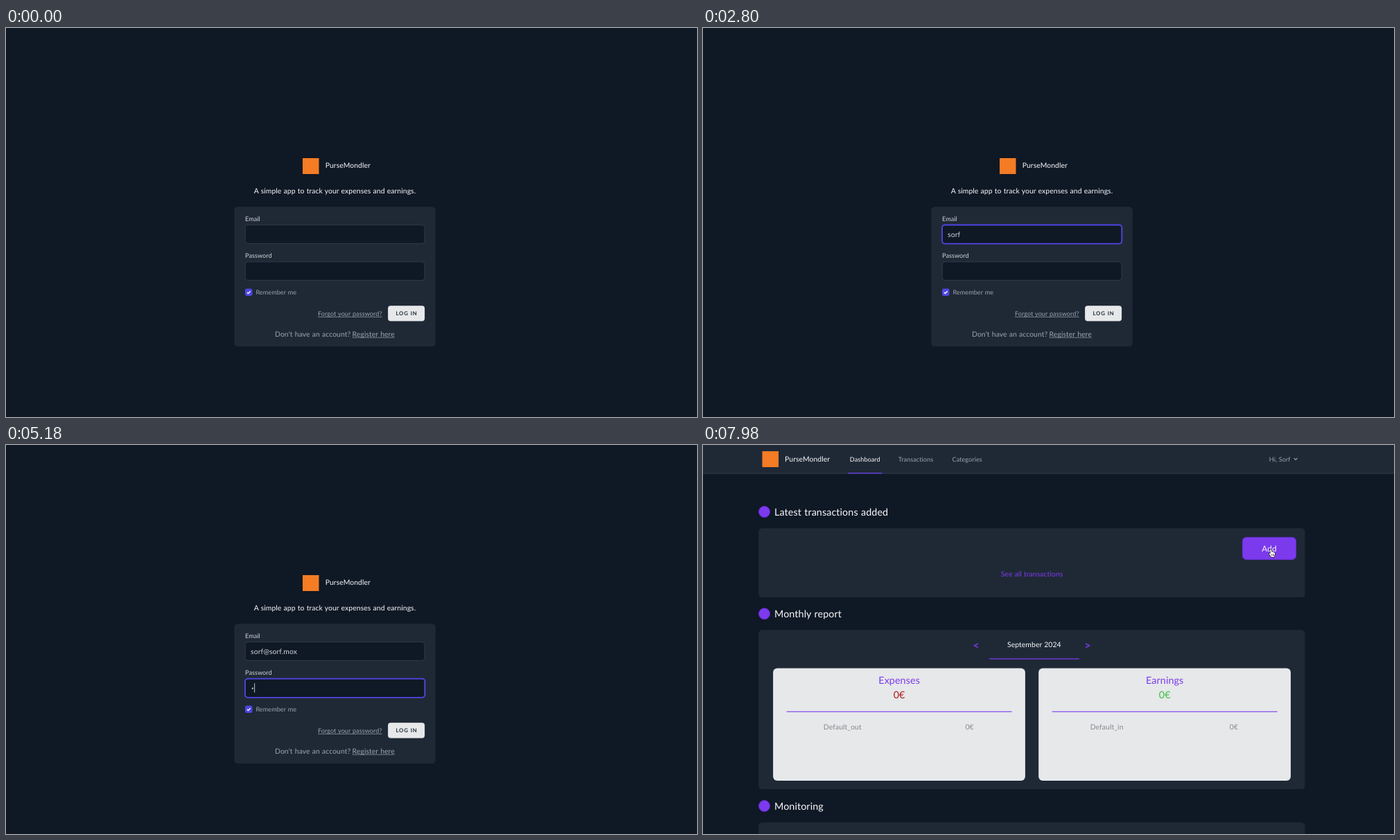
An HTML page with a canvas for the animation above (8 s loop, 997x562 px).

```html
<!DOCTYPE html>
<html lang="en">
<head>
<meta charset="utf-8">
<title>Expense tracker login</title>
<style>
  html, body { margin: 0; width: 100%; height: 100%; overflow: hidden; background: #0f1825; }
  canvas { display: block; width: 997px; height: 562px; }
</style>
</head>
<body>
<canvas id="stage"></canvas>
<script>
const W = 997, H = 562, LOOP = 8000, TICK = 70;
const canvas = document.getElementById('stage');
const ctx = canvas.getContext('2d');
const dpr = window.devicePixelRatio || 1;
canvas.width = Math.round(W * dpr);
canvas.height = Math.round(H * dpr);
ctx.textRendering = 'geometricPrecision';

const C = {
  bg: '#0f1825', panel: '#1f2936', border: '#374151', light: '#d1d5db',
  muted: '#9ca3af', white: '#f9fafb', pale: '#e6e8ea', indigo: '#4f46e5',
  violet: '#7c3aed', orange: '#f47c24', gray: '#85888e'
};
const APP = 'PurseMondler';

// Typing schedule: [time, field content]
const emailSteps = [
  [910, 's'], [980, 'so'], [1470, 'sor'], [1540, 'sorr'], [1680, 'sorrf'],
  [2100, 'sorr'], [2170, 'sor'], [2240, 'sorf'], [3150, 'sorf@'],
  [3360, 'sorf@s'], [3500, 'sorf@so'], [3710, 'sorf@sor'], [3850, 'sorf@sorf'],
  [3990, 'sorf@sorf.'], [4410, 'sorf@sorf.m'], [4480, 'sorf@sorf.mo'],
  [4550, 'sorf@sorf.mox']
];
const dotTimes = [5180, 5460, 5670, 5810, 6020, 6160, 6230, 6440];
const FOCUS = 630, SWITCH = 4690, LOGIN = 7000;

const lerp = (a, b, p) => a + (b - a) * p;
const clamp = p => Math.max(0, Math.min(1, p));
const easeOut = p => 1 - (1 - p) * (1 - p);
const smooth = p => p * p * (3 - 2 * p);

function box(x, y, w, h, r, fill, stroke, line = 0.8) {
  ctx.beginPath();
  ctx.roundRect(x, y, w, h, r);
  if (fill) { ctx.fillStyle = fill; ctx.fill(); }
  if (stroke) { ctx.strokeStyle = stroke; ctx.lineWidth = line; ctx.stroke(); }
}

function bar(x, y, w, h, color) {
  ctx.fillStyle = color;
  ctx.fillRect(x, y, w, h);
}

// y is the middle of the capital letters
function text(str, x, y, size, color, opt = {}) {
  ctx.font = `${opt.weight || 400} ${size}px Lato, "Open Sans", sans-serif`;
  ctx.letterSpacing = size * (opt.track || 0.007) + 'px';
  ctx.wordSpacing = size * 0.04 + 'px';
  ctx.textAlign = opt.align || 'left';
  ctx.fillStyle = color;
  const base = y + size * 0.36;
  ctx.fillText(str, x, base);
  const w = ctx.measureText(str).width;
  if (opt.underline) bar(x, base + 1.3, w, 0.7, color);
  return w;
}

const center = (str, x, y, size, color, opt) =>
  text(str, x, y, size, color, { ...opt, align: 'center' });

function trace(points) {
  ctx.beginPath();
  points.forEach(([x, y], i) => i ? ctx.lineTo(x, y) : ctx.moveTo(x, y));
}

function field(y, focused) {
  box(345.2, y, 258.8, 26.8, 4, C.bg, C.border);
  if (focused) box(345, y - 0.1, 259.4, 27.1, 4, null, C.indigo, 1.8);
}

function caret(x, y) {
  bar(x, y - 7, 0.9, 13.4, C.light);
}

function login(t) {
  box(428, 188, 23.5, 23, 0, C.orange);
  text(APP, 460.7, 198.7, 10.4, C.white);
  center('A simple app to track your expenses and earnings.', 474.5, 235.2, 10.4, C.white);
  box(329.3, 258.3, 290.5, 201.9, 5.2, C.panel);

  const onEmail = t >= FOCUS && t < SWITCH, onPass = t >= SWITCH;
  const step = emailSteps.filter(s => s[0] <= t).pop();
  const dots = dotTimes.filter(d => d <= t).length;

  text('Email', 345, 275.3, 9.1, C.light);
  field(284.6, onEmail);
  const w = step ? text(step[1], 353.1, 298, 10.4, C.light) : 0;
  const blink = t >= 2800 && t < 3150;
  if (onEmail && !blink) caret(353 + w, 298);

  text('Password', 345, 328.6, 9.1, C.light);
  field(337.8, onPass);
  ctx.fillStyle = C.light;
  for (let i = 0; i < dots; i++) {
    ctx.beginPath();
    ctx.arc(355.8 + i * 5.1, 351.7, 1.15, 0, Math.PI * 2);
    ctx.fill();
  }
  if (onPass && t < 6930) caret(353.1 + dots * 5.1, 351.2);

  box(345, 376.5, 10.4, 10.4, 2.6, C.indigo);
  trace([[347.8, 381.9], [349.5, 383.5], [352.7, 380.2]]);
  ctx.strokeStyle = '#fff';
  ctx.lineWidth = 1.4;
  ctx.stroke();
  text('Remember me', 360.4, 382, 9.1, C.muted);
  text('Forgot your password?', 450, 412.7, 9.1, C.muted, { underline: true });
  box(551.1, 401.3, 53, 22.2, 4, C.pale);
  center('LOG IN', 578, 412.6, 7.8, C.panel, { weight: 700, track: 0.1 });
  text("Don't have an account?", 388, 441.8, 10.4, C.muted);
  text('Register here', 499.6, 441.8, 10.4, C.muted, { underline: true });
}

function heading(str, y) {
  ctx.beginPath();
  ctx.arc(88.5, y, 8, 0, Math.PI * 2);
  ctx.fillStyle = C.violet;
  ctx.fill();
  ctx.strokeStyle = '#6429cf';
  ctx.lineWidth = 1;
  ctx.stroke();
  text(str, 103, y + 0.2, 14.3, C.white);
}

function card(x, title, color, label, labelX, valueX) {
  box(x, 322.5, 363.8, 162.4, 6, C.pale);
  center(title, x + 182, 340, 14.3, C.violet);
  center('0€', x + 182, 361.3, 14.3, color);
  bar(x + 19.5, 384.7, 325, 1.1, C.violet);
  text(label, labelX, 406.8, 10.4, C.gray);
  text('0€', valueX, 406.8, 10.4, C.gray);
}

function dashboard() {
  bar(0, 0, W, 41, C.panel);
  bar(0, 40.7, W, 0.8, C.border);
  box(85.5, 9, 23.5, 23, 0, C.orange);
  text(APP, 118, 20.3, 10.4, C.white);
  text('Dashboard', 211.8, 21, 9.1, C.white);
  bar(209.3, 40, 49.2, 1.4, '#6240e6');
  text('Transactions', 281.8, 21, 9.1, C.muted);
  text('Categories', 359.5, 21, 9.1, C.muted);
  text('Hi, Sorf', 816.7, 20.3, 9.1, C.muted);
  trace([[852.7, 18.9], [855.1, 21.3], [857.5, 18.9]]);
  ctx.strokeStyle = C.muted;
  ctx.lineWidth = 1.2;
  ctx.stroke();

  heading('Latest transactions added', 96.5);
  box(80.2, 120.2, 788.3, 99.7, 5.2, C.panel);
  box(778.4, 133.4, 77.2, 32, 5.5, C.violet, '#6a2fd4', 1);
  center('Add', 817, 149.3, 11.8, C.white);
  center('See all transactions', 474.5, 186.6, 10.4, C.violet);

  heading('Monthly report', 243.8);
  box(80.2, 267.3, 788.3, 230, 5.2, C.panel);
  center('<', 394, 289, 15.6, C.violet, { weight: 700 });
  center('>', 555.2, 289, 15.6, C.violet, { weight: 700 });
  center('September 2024', 477.8, 288, 10.4, C.white);
  bar(413.3, 308.3, 129.4, 1.3, C.violet);
  card(101.1, 'Expenses', '#b01818', 'Default_out', 173.8, 378.5);
  card(484.2, 'Earnings', '#3dbf42', 'Default_in', 558.7, 759.8);

  heading('Monitoring', 521.5);
  box(80.2, 545.2, 788.3, 40, 5.2, C.panel);
}

function outline(points, fill, stroke, line) {
  trace(points);
  ctx.closePath();
  ctx.lineJoin = 'round';
  ctx.strokeStyle = stroke;
  ctx.lineWidth = line;
  ctx.stroke();
  ctx.fillStyle = fill;
  ctx.fill();
}

const arrow = [[0, 0], [0, 10], [2.3, 7.9], [3.9, 11.4], [5.5, 10.7], [4, 7.3], [7.1, 7.3]];
const hand = [[-0.9, 0.2], [0, -0.4], [0.9, 0.2], [1.4, 3.7], [2.6, 3.4], [3.2, 4], [4.4, 3.9],
  [5, 4.6], [5.8, 4.8], [6.1, 6], [5.5, 8.7], [5, 11], [0.5, 11], [-0.8, 8.8], [-2.6, 6.5],
  [-2.2, 5.5], [-1.2, 5.7], [-0.3, 6.8]];

function pointer(kind, x, y) {
  ctx.save();
  ctx.translate(x, y);
  if (kind === 'beam') {
    bar(-0.5, -6, 1, 12, C.light);
    bar(-2.2, -6.8, 4.4, 0.9, C.light);
    bar(-2.2, 5.9, 4.4, 0.9, C.light);
  } else if (kind === 'hand') {
    outline(hand, '#fff', '#111', 1.2);
    for (const k of [1.2, 2.7, 4.1]) bar(k, 6.6, 0.6, 2.8, '#111');
  } else {
    outline(arrow, '#111', '#fff', 1.3);
  }
  ctx.restore();
}

function mouse(t) {
  if (t >= 70 && t < 910) {
    const p = smooth(clamp((t - 10) / 570));
    const x = lerp(484, 446.3, p), y = lerp(562, 298, p);
    const inField = (y > 284 && y < 312) || (y > 337 && y < 365);
    pointer(inField ? 'beam' : 'arrow', x, y);
  } else if (t >= 7420) {
    const out = smooth(clamp((t - 7395) / 375)), back = easeOut(clamp((t - 7770) / 210));
    const x = lerp(lerp(446, 837, out), 819.2, back);
    const y = lerp(lerp(282, 136.5, out), 150.8, back);
    pointer(x > 778 && y > 133 && y < 166 ? 'hand' : 'arrow', x, y);
  }
}

function draw(now) {
  const t = Math.floor((now % LOOP) / TICK) * TICK;
  ctx.setTransform(dpr, 0, 0, dpr, 0, 0);
  bar(0, 0, W, H, C.bg);
  if (t < LOGIN) login(t); else dashboard();
  mouse(t);
}

const start = performance.now();
function loop() {
  draw(performance.now() - start);
  requestAnimationFrame(loop);
}
loop();
</script>
</body>
</html>
```
